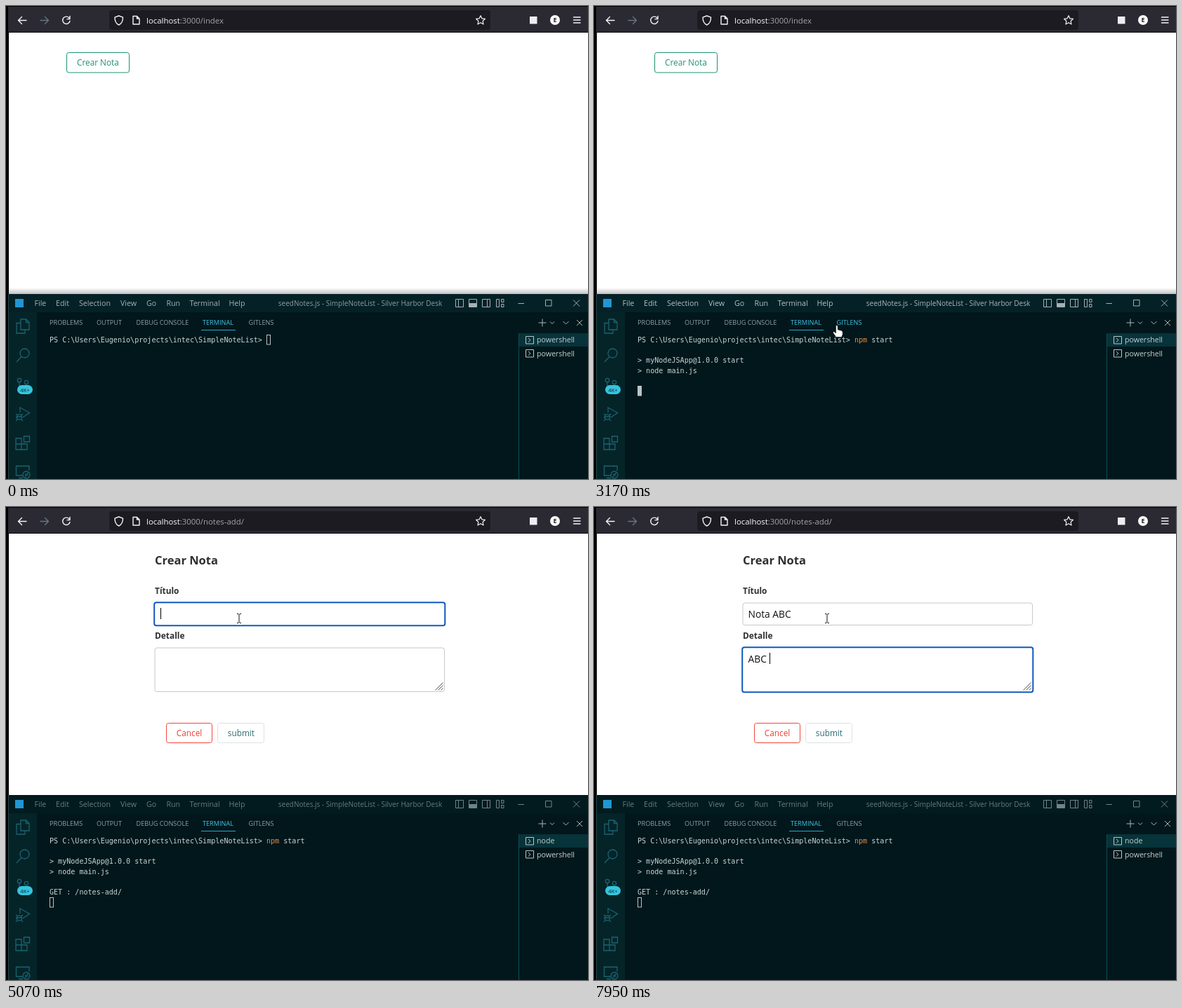
An HTML page for the animation above (8000 ms loop, 829 by 675 pixels).

```html
<!DOCTYPE html>
<html lang="es">
<head>
<meta charset="utf-8">
<title>Note list demo</title>
<style>
html, body { margin: 0; width: 100%; height: 100%; overflow: hidden; background: #000; }
svg { display: block; }
text { font-family: "Open Sans", "Noto Sans", sans-serif; white-space: pre; }
.mono text { font: 10.07px "DejaVu Sans Mono", monospace; fill: #c8d6d8; }
.line { fill: none; stroke-width: 1; }
.white { stroke: #f4f4f7; stroke-width: 1.4; stroke-linecap: round; stroke-linejoin: round; }
.teal { stroke: #1b6371; stroke-width: 1.3; }
.menu { font-size: 10.65px; }
.tab { font-size: 9.15px; fill: #8fa3a6; }
.side { font-size: 10.6px; fill: #c3d0d2; }
.page { font-size: 11.8px; }
.label { font-size: 11.9px; font-weight: 700; fill: #2f3033; }
.value { font-size: 13.8px; fill: #111; }
.drop { font-size: 9.75px; fill: #fbfbfe; }
</style>
</head>
<body>
<svg width="829" height="675" viewBox="0 0 829 675" xmlns="http://www.w3.org/2000/svg">
  <defs>
    <linearGradient id="fade" x1="0" y1="0" x2="0" y2="1">
      <stop offset="0" stop-color="#000" stop-opacity="0"/>
      <stop offset="1" stop-color="#000" stop-opacity=".24"/>
    </linearGradient>
  </defs>
  <rect width="829" height="675" fill="#000"/>

  <!-- browser bar -->
  <rect x="3" y="1" width="826" height="37" fill="#2b2a33"/>
  <rect x="3" y="37" width="826" height="1" fill="#0c0c0d"/>
  <rect x="147" y="6" width="543" height="28" rx="4" fill="#1c1b22"/>
  <g class="line white">
    <path d="M29 20.5H18M22.5 15.5L17.5 20.5L22.5 25.5"/>
    <path d="M49 20.5H60M55.5 15.5L60.5 20.5L55.5 25.5" stroke="#68757c"/>
    <g id="reload"><path d="M90.3 17.5A5.2 5.2 0 1 0 91 21.5M91 14.5V18.6H87"/></g>
    <path d="M160.7 14L166.5 16.2C166.5 21.5 165 25 160.7 27C156.400 25 155 21.500 155 16.200Z"/>
    <path d="M181 14.500H186.500L190 18V26H181ZM186.500 14.500V18H190"/>
    <path id="star"/>
    <path d="M808.500 16H818M808.500 20H818M808.500 24H818"/>
  </g>
  <rect x="746" y="15" width="10.500" height="10.500" fill="#eeeef2"/>
  <circle cx="782" cy="20" r="7" fill="#fff"/>
  <text x="782" y="23.200" text-anchor="middle" font-size="9" font-weight="700" fill="#222">E</text>
  <text x="200" y="24.800" font-size="11.4" fill="#fbfbfe">localhost<tspan id="path" fill="#a3a3aa"></tspan></text>

  <!-- web page -->
  <rect x="4" y="38" width="825" height="374" fill="#fff"/>
  <g id="home">
    <rect id="create" class="line" x="86.500" y="66.500" width="89" height="28.500" rx="3"/>
    <text id="createText" class="page" x="101" y="84.900">Crear Nota</text>
  </g>
  <g id="form">
    <text x="212" y="82" font-size="16.5" font-weight="700" fill="#2f3033">Crear Nota</text>
    <text class="label" x="212" y="124.300">Título</text>
    <text class="label" x="212" y="188.300">Detalle</text>
    <rect id="box1" x="212" y="137" width="413" height="31.500" rx="3" fill="#fff"/>
    <rect id="box2" x="212" y="201" width="413" height="62.500" rx="3" fill="#fff"/>
    <path class="line" stroke="#555" d="M611.500 261.500L622.500 250.500M615.500 261.500L622.500 254.500M619.500 261.500L622.500 258.500"/>
    <text id="val1" class="value" x="219.500" y="157.500"></text>
    <text id="val2" class="value" x="219.500" y="221.500"></text>
    <g id="list">
      <rect x="212" y="168" width="412.500" height="36" fill="#2b2a33"/>
      <text class="drop" x="217" y="181.300">another</text>
      <text class="drop" x="217" y="198.600">Demo summernote</text>
    </g>
    <rect id="caret" width="1" height="16" fill="#000"/>
    <rect class="line" x="228.500" y="308.500" width="65" height="28" rx="3" stroke="#f0473a"/>
    <text class="page" x="242.800" y="327" fill="#ee3b2f">Cancel</text>
    <rect class="line" x="301.500" y="308.500" width="66" height="28" rx="3" stroke="#dde1e4"/>
    <text class="page" x="315.800" y="327" fill="#2b6a6f">submit</text>
  </g>
  <rect id="shadow" x="4" y="402" width="825" height="9" fill="url(#fade)"/>
  <g id="status">
    <rect x="3" y="394" width="127.500" height="18" fill="#a2a3a3"/>
    <text x="6" y="406.800" font-size="9.85" fill="#fff">localhost:3000/notes-add/</text>
  </g>

  <!-- editor -->
  <rect x="3" y="411" width="826" height="264" fill="#02171b"/>
  <rect id="titleBar" x="4" y="411" width="825" height="26"/>
  <rect x="4" y="437" width="40" height="238" fill="#052428"/>
  <rect x="3" y="411" width="1" height="264" fill="#27474b"/>
  <rect x="13" y="418" width="12" height="12" fill="#2196d3"/>
  <g id="menus" class="menu"></g>
  <text id="title" x="504.500" y="427.700" text-anchor="middle" font-size="10">seedNotes.js - SimpleNoteList - Silver Harbor Desk</text>
  <g id="frames" class="line">
    <path d="M640.500 418.500H651.500V429.500H640.500ZM644.500 418.500V429.500"/>
    <path d="M659.500 418.500H670.500V429.500H659.500Z"/>
    <path d="M660 426.500H670" stroke-width="5"/>
    <path d="M678.500 418.500H689.500V429.500H678.500ZM685.500 418.500V429.500"/>
    <path d="M698.500 418.500H702.500V429.500H698.500ZM705.500 418.500H709V422.500H705.500ZM705.500 425.500H709V429.500H705.500Z"/>
    <path d="M729.500 424.500H738M768.500 419.500H777V428H768.500ZM808 419.500L817 428.500M817 419.500L808 428.500"/>
  </g>

  <g class="line teal">
    <path d="M21 447H28.500L33 451.500V462H21ZM28.500 447V451.500H33M21 452.500H15V467H27V462"/>
    <circle cx="26.500" cy="495.500" r="6.500"/><path d="M22 500.500L15 508"/>
    <circle cx="19" cy="534" r="2.700"/><circle cx="29" cy="537" r="2.700"/><path d="M19 537V547M29 540Q28 544 21 544"/>
    <path d="M20 580V573L33.500 580.500L24 587"/><circle cx="19" cy="586.500" r="3.700"/>
    <path d="M14 582L16.500 584M14 587H15.300M14 592L16.500 589.500M24 582L21.500 584M24 592L21.500 589.500M15.300 586H22.700"/>
    <path d="M14 617H22V625H30V633H14ZM14 625H22V633M25.500 614H33.500V622H25.500Z"/>
    <path d="M24 670H14.500V656.500H33V663M18 673.500H24"/>
    <circle cx="29" cy="669" r="5"/><path d="M27 668L29 670L27 672M31.500 666L29.500 668L31.500 670"/>
  </g>
  <rect x="16" y="541" width="22" height="13" rx="6.500" fill="#35c5df"/>
  <text x="27" y="550.500" text-anchor="middle" font-size="7.6" fill="#04252b">4K+</text>

  <g id="tabs"></g>
  <rect x="278" y="462" width="49" height="1" fill="#2ba6c6"/>
  <path class="line" stroke="#a9b8ba" stroke-width="1.200" d="M758.500 452H769.500M764 446.500V457.500M775 450.500L778 453.500L781 450.500M793.500 450L797.500 454L801.500 450M813 448L821 456M821 448L813 456"/>
  <rect x="730" y="467" width="1" height="208" fill="#0c4e58"/>
  <rect x="731" y="467" width="98" height="19" fill="#07333a"/>
  <path class="line" stroke="#b9c8ca" d="M740.500 471.500H751.500V482H740.500ZM744 474L747 476.800L744 479.500M740.500 490.500H751.500V501H740.500ZM744 493L747 495.800L744 498.500"/>
  <text id="shell" class="side" x="756" y="480.300"></text>
  <text class="side" x="756" y="499.600">powershell</text>

  <g class="mono">
    <text x="62" y="479.600">PS C:\Users\Eugenio\projects\intec\SimpleNoteList> <tspan id="cmd" fill="#e98b42"></tspan><tspan id="arg"></tspan></text>
    <g id="out">
      <text x="62" y="508.900">> myNodeJSApp@1.0.0 start</text>
      <text x="62" y="523.600">> node main.js</text>
    </g>
    <text id="get" x="62" y="552.900">GET : /notes-add/</text>
    <rect id="block" width="6" height="14"/>
  </g>

  <!-- pointers, hot spot at 0,0 -->
  <g id="mouse">
    <path id="arrow" d="M0 0V15L3.500 11.800L5.800 17L8.200 16L6 10.800H10.500Z" fill="#fff" stroke="#111"/>
    <path id="hand" d="M-1.500 1Q0 -1.500 1.500 1V6L7 7.500Q8.500 8 8.500 10V13L7 17H-1L-5.500 10.500Q-5.500 8.500 -3.500 9L-1.500 11Z" fill="#fff" stroke="#111" stroke-width=".9"/>
    <path id="beam" class="line" d="M-3 -6.500H-1L0 -5.500L1 -6.500H3M0 -5.500V5.500M-3 6.500H-1L0 5.500L1 6.500H3"/>
  </g>
</svg>
<script>
const LOOP = 8000, STEP = 68.8, CHAR = 6.06, ROW = 14.67;
const CLICK = 3930, LOADED = 4330, FOCUS = 5010, TAB = 6890;
const $ = id => document.getElementById(id);
const set = (id, attrs) => { for (const k in attrs) $(id).setAttribute(k, attrs[k]); };
const show = (id, on) => set(id, { visibility: on ? "inherit" : "hidden" });
const say = (id, s) => { if ($(id).textContent !== s) $(id).textContent = s; };

const row = (id, y, items, cls) => {
  $(id).innerHTML = items.map(([x, s]) => `<text class="${cls}" x="${x}" y="${y}">${s}</text>`).join("");
};
row("menus", 427.8, [[40.5, "File"], [71, "Edit"], [104, "Selection"], [163, "View"], [200, "Go"], [228.5, "Run"], [261.5, "Terminal"], [317.5, "Help"]], "menu");
row("tabs", 455.4, [[62, "PROBLEMS"], [129, "OUTPUT"], [185.5, "DEBUG CONSOLE"], [280, "TERMINAL"], [345.5, "GITLENS"]], "tab");
const [, , , activeTab, lastTab] = $("tabs").children;
activeTab.style.fill = "#43c3e6";

const star = [...Array(10).keys()].map(i => {
  const r = i % 2 ? 3.3 : 6.8, a = (i / 5 - 0.5) * Math.PI;
  return (676 + r * Math.cos(a)).toFixed(1) + " " + (20.5 + r * Math.sin(a)).toFixed(1);
});
set("star", { d: "M" + star.join("L") + "Z", "stroke-width": 1.2 });

// one time per typed letter
const typed = (s, times, t) => s.slice(0, times.filter(x => t >= x).length);
const KEYS = {
  cmd: ["npm", [1080, 1220, 1350]],
  arg: [" start", [1490, 1620, 1760, 1820, 1960, 2100]],
  val1: ["Nota ABC", [5800, 5870, 6010, 6080, 6220, 6490, 6560, 6690]],
  val2: ["ABC ", [7420, 7550, 7680, 7950]]
};

// time, x, y
const PATH = [
  [120, 497, 682], [400, 516, 615], [2891, 516, 615], [3097, 372, 505], [3166, 346, 456],
  [3400, 225, 300], [3717, 95, 100], [3786, 110, 84], [CLICK, 114, 82], [4060, 178, 112],
  [4198, 148.5, 142], [4530, 201, 263], [4610, 206, 260], [4960, 332, 159], [LOOP, 332, 159]
];
function mouseAt(t) {
  const q = 2960 + Math.floor((t - 2960) / STEP) * STEP;
  const i = Math.max(1, PATH.findIndex(p => p[0] >= q));
  const [a, b] = [PATH[i - 1], PATH[i]];
  const k = Math.max(0, (q - a[0]) / (b[0] - a[0]));
  return [a[1] + (b[1] - a[1]) * k, a[2] + (b[2] - a[2]) * k];
}
const inside = (x, y, l, t, r, b) => x >= l && x <= r && y >= t && y <= b;

function drawMouse(t, loaded) {
  const [x, y] = mouseAt(t);
  const onTab = inside(x, y, 340, 441, 386, 463);
  const onButton = !loaded && inside(x, y, 86, 66, 176, 95);
  const onField = loaded && (inside(x, y, 211, 136, 626, 169) || inside(x, y, 211, 200, 626, 264));
  const dark = y > 466;
  const kind = onTab || onButton ? "hand" : dark || onField ? "beam" : "arrow";
  show("mouse", t >= 140);
  set("mouse", { transform: `translate(${x.toFixed(1)} ${y.toFixed(1)})` });
  for (const id of ["arrow", "hand", "beam"]) show(id, id === kind && t >= 140);
  set("beam", { stroke: dark ? "#f2f2f2" : "#111" });
  lastTab.style.fill = onTab ? "#43c3e6" : "";
  return onButton;
}

function drawEditor(t) {
  const live = t >= 70 && t < CLICK, away = t >= CLICK;
  set("titleBar", { fill: away ? "#021b1f" : "#042127" });
  set("menus", { fill: away ? "#697c7f" : live ? "#b4c1c3" : "#a5b3b5" });
  set("title", { fill: away ? "#667a7d" : live ? "#a9b8ba" : "#8c9da0" });
  set("frames", { stroke: away ? "#718387" : "#a3b2b4" });
  show("shadow", !away);
  say("shell", t >= 3400 ? "node" : "powershell");
  for (const id of ["cmd", "arg"]) say(id, typed(...KEYS[id], t));
  show("out", t >= 2760);
  show("get", t >= 4060);

  const line = t >= 4060 ? 6 : t >= 2760 ? 5 : t >= 2240 ? 1 : 0;
  const col = line ? 0 : 51 + $("cmd").textContent.length + $("arg").textContent.length;
  const gap = live ? 0 : 0.5;
  set("block", {
    x: Math.round(62 + col * CHAR) + gap, y: Math.round(468.5 + line * ROW) + gap,
    width: 6 - gap * 2, height: 14.5 - gap * 2,
    fill: live ? "#b5c6c9" : "none", stroke: live ? "none" : "#b5c6c9"
  });
}

function drawBox(id, on, y, h) {
  const g = on ? 0.8 : 0;
  set(id, {
    x: 212 - g, y: y - g, width: 412.5 + g * 2, height: h + g * 2,
    stroke: on ? "#1159bd" : "#c6c8ca", "stroke-width": on ? 2 : 1
  });
}

function drawPage(t, loaded, hover) {
  show("home", !loaded);
  show("form", loaded);
  say("path", loaded ? ":3000/notes-add/" : ":3000/index");
  show("status", !loaded && (hover || t >= CLICK));
  set("reload", { transform: `translate(${t >= 4060 && t < 4500 ? 1 : 0} 0)` });
  const tone = hover || t >= CLICK ? "#4fb999" : "#1c9273";
  set("create", { stroke: tone });
  set("createText", { fill: tone });

  const first = t >= FOCUS && t < TAB, second = t >= TAB;
  const listed = t >= 5870 && t < 6080;
  drawBox("box1", first, 137, 31.5);
  drawBox("box2", second, 201, 62.5);
  for (const id of ["val1", "val2"]) say(id, typed(...KEYS[id], t));
  show("list", loaded && listed);
  show("caret", (first || second) && !listed && !(t >= 5470 && t < 5800));
  const width = $(second ? "val2" : "val1").getComputedTextLength();
  set("caret", { x: Math.round(219.6 + width), y: second ? 208 : 144 });
}

function draw(t) {
  const loaded = t >= LOADED;
  const hover = drawMouse(t, loaded);
  drawEditor(t);
  drawPage(t, loaded, hover);
}

const start = performance.now();
function tick(now) {
  draw(Math.max(0, now - start) % LOOP);
  requestAnimationFrame(tick);
}
draw(0);
requestAnimationFrame(tick);
</script>
</body>
</html>
```
